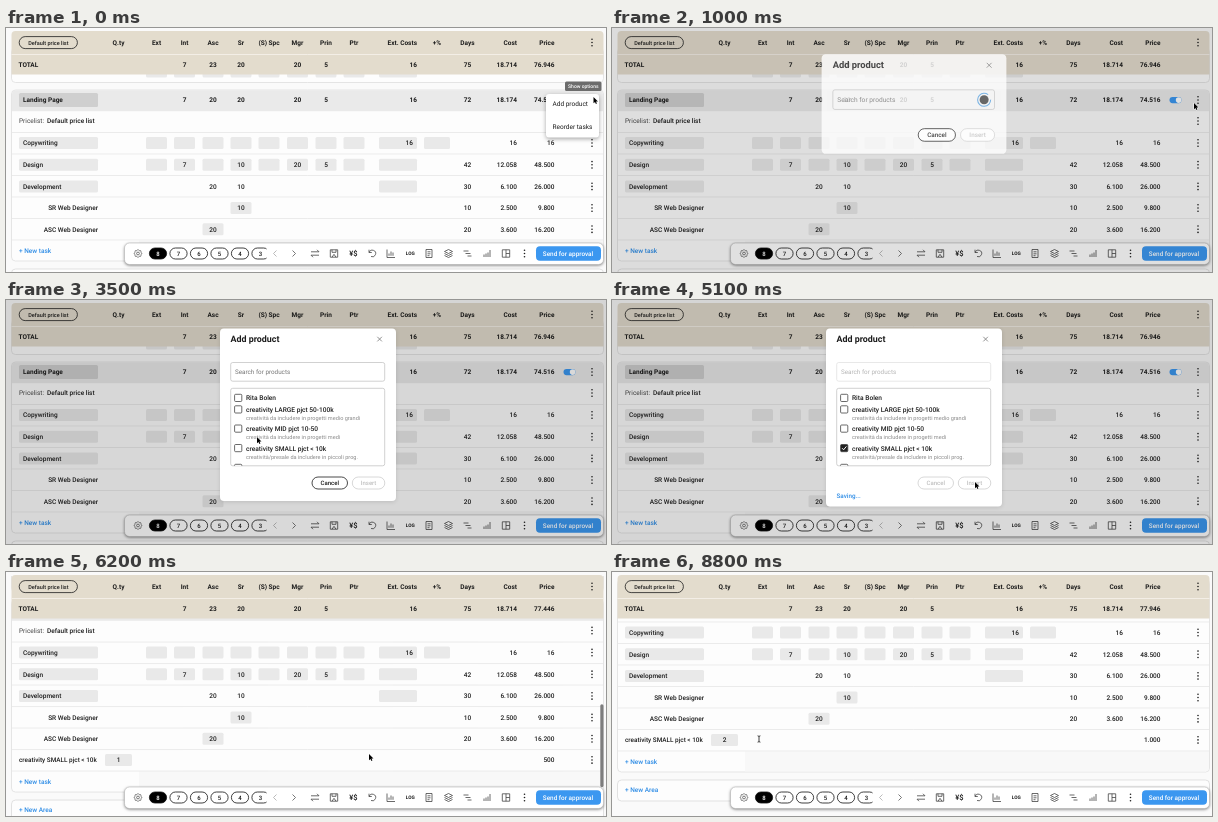
Write an HTML page with a canvas that moves like this. It is 600 px wide and 244 px high and loops after 8.9 s.

```html
<!DOCTYPE html>
<html lang="en">
<head>
<meta charset="utf-8">
<title>Add product</title>
<style>
html, body { margin: 0; height: 100%; overflow: hidden; background: #fafafa; }
canvas { display: block; width: 600px; height: 244px; }
</style>
</head>
<body>
<canvas id="stage"></canvas>
<script>
const LOOP = 8900, W = 600, H = 244;
const INK = '#1c1c1c', BLUE = '#3b97f0', LINK = '#2f8de6', BEIGE = '#e3dccd', PAGE = '#fafafa';
const stage = document.getElementById('stage'), c = stage.getContext('2d');
const dpr = window.devicePixelRatio || 1;
stage.width = W * dpr;
stage.height = H * dpr;

const ROLES = ['Ext', 'Int', 'Asc', 'Sr', '(S) Spc', 'Mgr', 'Prin', 'Ptr'];
const ROLE_X = [150.5, 178.5, 207, 235, 263, 291.5, 320, 348];

// Toolbar glyphs, drawn around their centre
const ICONS = [
  [269, 'M1.5-3L-1.5 0 1.5 3', '#aaa'],
  [288, 'M-1.5-3L1.5 0-1.5 3', '#555'],
  [309, 'M-4-1.7H4L2-3.7M4 1.7H-4L-2 3.7'],
  [328, 'M-3.7-3.7H3.7V3.7H-3.7ZM-2-3.7V-1.2H2V-3.7M-2 3.7L0 .8 2 3.7'],
  [366.5, 'M-3.5-3.8V-1H-.7M-3.3-1A3.3 3.3 0 1 1-1.5 3'],
  [385, 'M-4-4V4H4M-2 2.3V0M0 2.3V-2M2 2.3V-1'],
  [423, 'M-3-4H3V4H-3ZM-1.5-1.7H1.5M-1.5 .3H1.5M-1.5 2.2H.5'],
  [442.5, 'M0-4L4-2 0 0-4-2ZM-4 0L0 2 4 0M-4 2L0 4 4 2'],
  [461.5, 'M-4-2.5H1M-2 0H3M0 2.5H4'],
  [481, 'M-3 3.5V1M-1 3.5V0M1 3.5V-1M3 3.5V-3.5'],
  [500, 'M-3.7-3.7H3.7V3.7H-3.7ZM0-3.7V3.7M0 0H3.7']
].map(([x, d, color]) => [x, new Path2D(d), color || '#444']);
const ARROW = new Path2D('M0 0V6.2L1.5 4.9 2.4 7 3.4 6.6 2.5 4.6H4.5Z');
const IBEAM = new Path2D('M-1.4-3.2Q0-3.2 0-2.4Q0-3.2 1.4-3.2M0-2.4V2.4M-1.4 3.2Q0 3.2 0 2.4Q0 3.2 1.4 3.2');

// Pointer stops: time, x, y
const POINTER = [
  [0, 587.5, 69], [150, 587.5, 69], [600, 576, 76], [950, 582, 75], [1500, 582, 75],
  [2650, 252, 114.5], [2950, 252, 114.5], [3500, 251, 137], [3800, 232, 147], [4150, 232, 147],
  [4700, 363, 182], [6950, 363, 182], [7270, 115.5, 169], [7950, 115.5, 169], [8500, 147, 167]
];

const clamp = v => Math.max(0, Math.min(1, v));
const easeOut = v => 1 - (1 - clamp(v)) ** 2;
const smooth = v => v * v * (3 - 2 * v);

function box(x, y, w, h, r, fill, stroke, lw = 0.7) {
  c.beginPath();
  c.roundRect(x, y, w, h, r);
  if (fill) { c.fillStyle = fill; c.fill(); }
  if (stroke) { c.strokeStyle = stroke; c.lineWidth = lw; c.stroke(); }
}

function dot(x, y, r, fill) {
  c.beginPath();
  c.arc(x, y, r, 0, 7);
  c.fillStyle = fill;
  c.fill();
}

function line(x1, y1, x2, y2, color, lw = 0.7) {
  c.beginPath();
  c.moveTo(x1, y1);
  c.lineTo(x2, y2);
  c.strokeStyle = color;
  c.lineWidth = lw;
  c.stroke();
}

// y is the middle of the capitals
function text(s, x, y, { size = 6.5, weight = 500, align = 'left', color = INK } = {}) {
  c.font = `${weight} ${size}px Roboto, sans-serif`;
  c.textAlign = align;
  c.fillStyle = color;
  c.fillText(s, x, y + size * 0.355);
}

const mid = (s, x, y, o) => text(s, x, y, { align: 'center', ...o });
const right = (s, x, y, o) => text(s, x, y, { align: 'right', ...o });
const dots = (x, y) => [-3.2, 0, 3.2].forEach(d => dot(x, y + d, 0.8, INK));
const cell = (x, y, w = 21) => box(x - w / 2, y - 6, w, 12, 1.5, '#e9e9e9');

function shadow(color, blur, dy) {
  c.shadowColor = color;
  c.shadowBlur = blur * dpr;
  c.shadowOffsetY = dy * dpr;
}
const noShadow = () => shadow('transparent', 0, 0);

function numbers(y, roles, [costs, days, cost, price], weight = 500, costX = 407) {
  roles.forEach((v, i) => v && mid(v, ROLE_X[i], y, { weight }));
  right(costs, costX, y, { weight });
  mid(days, 461.5, y, { weight });
  right(cost, 511, y, { weight });
  right(price, 548.5, y, { weight });
}

function taskRow(name, y, cells, roles, sums) {
  cell(52.5, y, 79);
  text(name, 17, y);
  cells.forEach(i => cell(ROLE_X[i], y));
  cell(392, y, 38);
  numbers(y, roles, sums);
  dots(586, y);
}

function subRow(name, y, role, count, sums) {
  right(name, 92, y);
  cell(ROLE_X[role], y);
  mid(count, ROLE_X[role], y);
  numbers(y, [], sums);
  dots(586, y);
}

function content(t, scroll) {
  const added = t >= 5500, extra = added ? 21.5 : 0;
  const all = [0, 1, 2, 3, 4, 5, 6, 7];
  c.save();
  c.translate(0, -scroll);

  box(5.5, 20, 592, 34.5, 4, '#fdfdfd', '#dcdcdc');
  all.forEach(i => cell(ROLE_X[i], 43.5));
  cell(392, 43.5, 38);

  box(5.5, 62, 592, 171 + extra, 4, '#fdfdfd', '#dcdcdc');
  box(133, 212.5 + extra, 464, 20, [0, 0, 4, 0], '#f8f8f8');
  box(6, 62.3, 591, 21, [4, 4, 0, 0], '#eaeaea');
  box(13, 65, 79, 14, 1.5, '#cfcfcf');
  text('Landing Page', 17, 72, { weight: 700 });
  numbers(72, ['', 7, 20, 20, '', 20, 5], [16, 72, '18.174', added ? '75.016' : '74.516'], 700, 411);
  box(557.5, 69, 12, 6.2, 3.1, BLUE);
  dot(566.6, 72.1, 2.8, '#fff');
  dots(586, 72);

  text('Pricelist:', 13, 93, { weight: 400, color: '#444' });
  text('Default price list', 41, 93);
  dots(586, 93);
  for (let i = 0; i < (added ? 7 : 6); i++) line(6, 104.5 + i * 21.5, 597, 104.5 + i * 21.5, '#e4e4e4');

  taskRow('Copywriting', 115, all, [], [16, '', '16', '16']);
  cell(431, 115, 26);
  taskRow('Design', 136.8, all, ['', 7, '', 10, '', 20, 5], ['', 42, '12.058', '48.500']);
  taskRow('Development', 158.4, [], ['', '', 20, 10], ['', 30, '6.100', '26.000']);
  subRow('SR Web Designer', 180, 3, 10, ['', 10, '2.500', '9.800']);
  subRow('ASC Web Designer', 201.2, 2, 20, ['', 20, '3.600', '16.200']);

  if (added) {
    const y = 222.4;
    text('creativity SMALL pjct < 10k', 13, y, { size: 6.4 });
    cell(112.5, y, 27);
    if (t >= 7280 && t < 7900) box(110.3, y - 3.7, 4.4, 7.4, 0, '#a9cdf3');
    mid(t < 7900 ? 1 : 2, 112.5, y);
    right(t < 8500 ? '500' : '1.000', 548.5, y);
    dots(586, y);
  }
  text('+ New task', 13, 222.5 + extra, { color: LINK });
  box(5.5, 241 + extra, 592, 21, 4, '#fdfdfd', '#d6d6d6');
  text('+ New Area', 13, 251 + extra, { color: LINK });
  c.restore();
}

function header(t) {
  box(0, 0, W, 4, 0, PAGE);
  box(5.5, 3, 592, 43.5, [4, 4, 0, 0], BEIGE);
  line(5.5, 26.5, 597.5, 26.5, '#f3eee6', 1);
  box(13.2, 8.6, 58.2, 12, 6, null, INK, 0.8);
  mid('Default price list', 42.4, 14.6, { size: 5.5 });
  const o = { weight: 600 }, y = 14.5;
  mid('Q.ty', 112.5, y, o);
  ROLES.forEach((s, i) => mid(s, ROLE_X[i], y, o));
  right('Ext. Costs', 411, y, o);
  mid('+%', 431, y, o);
  mid('Days', 461.5, y, o);
  right('Cost', 511, y, o);
  right('Price', 548.5, y, o);
  dots(586, y);
  text('TOTAL', 12.5, 37, { weight: 700 });
  const price = t < 5500 ? '76.946' : t < 8800 ? '77.446' : '77.946';
  numbers(37, ['', 7, 23, 20, '', 20, 5], [16, 75, '18.714', price], 700, 411);
}

function toolbar() {
  const y = 225.5;
  shadow('rgba(0,0,0,.5)', 3, 1);
  box(118.5, 215, 479, 21.5, 5, '#fff');
  noShadow();
  box(118.5, 215, 479, 21.5, 5, null, '#b5b5b5', 0.6);

  c.beginPath();
  c.arc(132, y, 1.4, 0, 7);
  c.strokeStyle = '#444';
  c.lineWidth = 0.7;
  c.stroke();
  c.beginPath();
  for (let i = 0; i <= 64; i++) {
    const a = i / 64 * Math.PI * 2, r = 3.5 + 0.4 * Math.cos(8 * a);
    c.lineTo(132 + r * Math.cos(a), y + r * Math.sin(a));
  }
  c.stroke();

  c.save();
  c.beginPath();
  c.rect(140, 215, 120.5, 21);
  c.clip();
  [8, 7, 6, 5, 4, 3].forEach((n, i) => {
    const x = 152 + i * 20.5;
    box(x - 8.6, y - 5.5, 17.2, 11, 5.5, i ? '#fff' : '#000', '#111', 0.8);
    mid(n, x, y, { size: 6, color: i ? INK : '#fff' });
  });
  c.restore();

  for (const [x, path, color] of ICONS) {
    c.save();
    c.translate(x, y);
    c.strokeStyle = color;
    c.lineWidth = 0.8;
    c.stroke(path);
    c.restore();
  }
  mid('¥$', 347.5, y, { size: 7.5 });
  mid('LOG', 404.3, y, { size: 4.8, weight: 700 });
  dots(518.5, y);
  box(530, 218.3, 65, 14.5, 4, BLUE);
  mid('Send for approval', 562, y, { size: 6.4, color: '#fff' });
}

function menu() {
  shadow('rgba(0,0,0,.35)', 4, 1.5);
  box(540, 66, 53, 43.5, 3, '#fff');
  noShadow();
  text('Add product', 546.5, 76, { weight: 400 });
  text('Reorder tasks', 546.5, 98.3, { weight: 400 });
}

function tooltip() {
  box(559, 53.5, 36.5, 9.5, 1.5, '#6c6c6c');
  mid('Show options', 577.3, 58.3, { size: 5, color: '#fff' });
}

function option(y, label, note, checked) {
  box(228.6, y - 3.7, 7.2, 7.2, 1, checked ? '#222' : '#fff', '#444', 0.8);
  if (checked) {
    line(230.1, y, 231.6, y + 1.6, '#fff', 1);
    line(231.6, y + 1.6, 234.4, y - 1.8, '#fff', 1);
  }
  text(label, 240, y, { size: 6.6 });
  if (note) text(note, 240, y + 8.4, { size: 5.55, weight: 400, color: '#8a8a8a' });
}

function button(label, x, y, w, on) {
  box(x, y - 6, w, 12, 6, '#fff', on ? INK : '#cfcfcf', 0.8);
  mid(label, x + w / 2, y, { size: 6, color: on ? INK : '#c0c0c0' });
}

function dialog(t, shown) {
  const loaded = t >= 2000, saving = t >= 4850, checked = t >= 4000;
  const grow = loaded ? 77.5 : 0, buttonY = 105.5 + grow;
  const scale = 1.14 - 0.14 * shown;
  c.save();
  c.globalAlpha = Math.sqrt(shown);
  c.translate(302, 76);
  c.scale(scale, scale);
  c.translate(-302, -76);
  shadow(`rgba(0,0,0,${0.12 * shown ** 4})`, 4, 1);
  box(214, 28.5, 176, 95 + grow + (saving ? 5.5 : 0), 4, '#fff');
  noShadow();
  text('Add product', 224.5, 39, { size: 8.9, weight: 600 });
  line(371.3, 36.8, 375.9, 41.4, '#777', 0.8);
  line(375.9, 36.8, 371.3, 41.4, '#777', 0.8);

  box(224.7, 62.5, 154, 18.7, 2, null, saving ? '#dedede' : '#bdbdbd');
  text('Search for products', 229, 72, { size: 6.3, weight: 400, color: saving ? '#b5b5b5' : '#777' });
  if (!loaded) {
    const a = t / 160;
    c.beginPath();
    c.arc(368.8, 72, 6.2, a, a + 5.4);
    c.strokeStyle = '#5ba3e0';
    c.lineWidth = 1;
    c.stroke();
    dot(368.8, 72, 4.3, '#444');
  } else {
    c.save();
    box(224.7, 88.3, 154, 77.5, 2, '#fff', '#bdbdbd');
    c.clip();
    option(98, 'Rita Bolen');
    option(109.5, 'creativity LARGE pjct 50-100k', 'creatività da includere in progetti medio grandi');
    option(128.7, 'creativity MID pjct 10-50', 'creatività da includere in progetti medi');
    option(148.2, 'creativity SMALL pjct < 10k', 'creatività/presale da includere in piccoli prog.', checked);
    option(168, '');
    c.restore();
  }
  button('Cancel', 306, buttonY, 35.5, !saving);
  button('Insert', 346.3, buttonY, 32.5, checked && !saving);
  if (saving) text('Saving...', 224.5, 196, { size: 6.3, color: LINK });
  c.restore();
}

function pointer(t) {
  let i = 0;
  while (i < POINTER.length - 2 && t >= POINTER[i + 1][0]) i++;
  const [t0, x0, y0] = POINTER[i], [t1, x1, y1] = POINTER[i + 1];
  const k = smooth(clamp((t - t0) / (t1 - t0)));
  c.save();
  c.translate(x0 + (x1 - x0) * k, y0 + (y1 - y0) * k);
  if (t >= 8300) {
    c.strokeStyle = '#111';
    c.lineWidth = 0.8;
    c.stroke(IBEAM);
  } else {
    c.lineWidth = 1;
    c.strokeStyle = '#fff';
    c.stroke(ARROW);
    c.fillStyle = '#000';
    c.fill(ARROW);
  }
  c.restore();
}

function draw(t) {
  c.setTransform(dpr, 0, 0, dpr, 0, 0);
  c.textRendering = 'geometricPrecision';
  box(0, 0, W, H, 0, PAGE);

  const scroll = 54.5 * easeOut((t - 6020) / 460);
  content(t, scroll);
  header(t);
  toolbar();
  const bar = clamp((t - 6020) / 80) * clamp((7150 - t) / 150);
  if (bar > 0) {
    c.globalAlpha = bar;
    box(594.3, 96 + scroll * 1.05, 3.2, 83, 1.6, '#7d7d7d');
    c.globalAlpha = 1;
  }
  if (t < 850) menu();
  if (t < 250) tooltip();

  const shown = easeOut((t - 900) / 250) * (1 - easeOut((t - 5380) / 200));
  if (shown > 0) {
    box(0, 0, W, H, 0, `rgba(0,0,0,${0.15 * Math.sqrt(shown)})`);
    dialog(t, shown);
  }
  pointer(t);
}

function frame() {
  draw(performance.now() % LOOP);
  requestAnimationFrame(frame);
}
frame();
</script>
</body>
</html>
```
